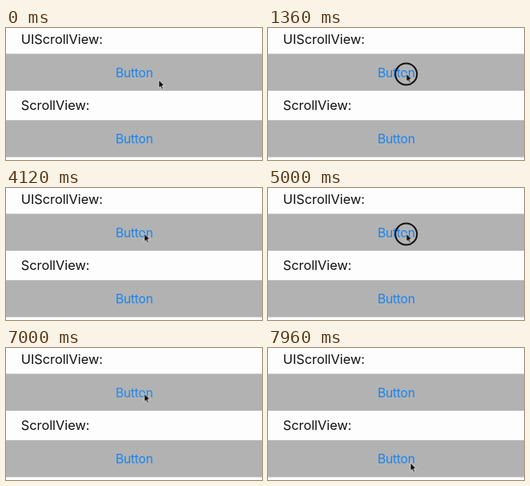
Animation, 320 px wide and 166 px high, one loop 8 s. Source, as an HTML page:

```html
<!DOCTYPE html>
<html lang="en">
<head>
<meta charset="utf-8">
<title>Scroll view button highlight</title>
<style>
  html, body { margin: 0; width: 100%; height: 100%; overflow: hidden; background: #fdfdfd; }
  svg { display: block; width: 100%; height: 100%; }
  text { font-family: Inter, Roboto, sans-serif; }
  .label { font-size: 16.4px; letter-spacing: -.05px; fill: #111; }
  .button { font-size: 15.7px; letter-spacing: -.25px; fill: #1685f2; text-anchor: middle; }
  .band { fill: #b2b2b2; }
  .ring { fill: none; stroke: #111; stroke-width: 2; }
  .arrow { fill: #0c0c0c; stroke: #eee; stroke-width: .8; stroke-linejoin: round; }

  .pressed { animation: highlight 8s linear infinite; }
  .ring { animation: press 8s step-end infinite; }
  .arrow { animation: move 8s linear infinite; }

  /* Delayed dimming after each press, slow recovery after release */
  @keyframes highlight {
    0% { opacity: 1; animation-timing-function: step-end; }
    23% { opacity: .6; animation-timing-function: step-end; }
    24% { opacity: .28; }
    37% { opacity: .28; animation-timing-function: cubic-bezier(.35, .1, .35, 1); }
    50% { opacity: 1; animation-timing-function: step-end; }
    67.5% { opacity: .28; }
    79% { opacity: .28; animation-timing-function: cubic-bezier(.35, .1, .35, 1); }
    92% { opacity: 1; }
    100% { opacity: 1; }
  }
  @keyframes press {
    0%, 37%, 79%, 100% { visibility: hidden; }
    17%, 62.5% { visibility: visible; }
  }
  @keyframes move {
    0% { transform: translate(191px, 65.2px); }
    1.5% { transform: translate(183px, 62px); }
    3% { transform: translate(171.5px, 56px); }
    4.5%, 87.5% { transform: translate(172.8px, 57.2px); }
    89% { transform: translate(175.5px, 73px); }
    91.5% { transform: translate(184px, 101.2px); }
    95.5% { transform: translate(182px, 126px); }
    99.5%, 100% { transform: translate(178px, 144.2px); }
  }
</style>
</head>
<body>
<svg viewBox="0 0 320 166" preserveAspectRatio="none">
  <rect width="320" height="166" fill="#fdfdfd"/>
  <rect class="band" y="32.4" width="320" height="46.5"/>
  <rect class="band" y="115.9" width="320" height="46.5"/>
  <text class="label" x="18.8" y="19.6">UIScrollView:</text>
  <text class="label" x="18.8" y="103">ScrollView:</text>
  <text class="button pressed" x="160.3" y="61.5">Button</text>
  <text class="button" x="160.3" y="145">Button</text>
  <circle class="ring" cx="172.7" cy="58" r="13.5"/>
  <path class="arrow" d="M0 0V10.4L2.3 8.3L4 12L5.7 11.3L4.1 7.6H7.2Z"/>
</svg>
</body>
</html>
```
